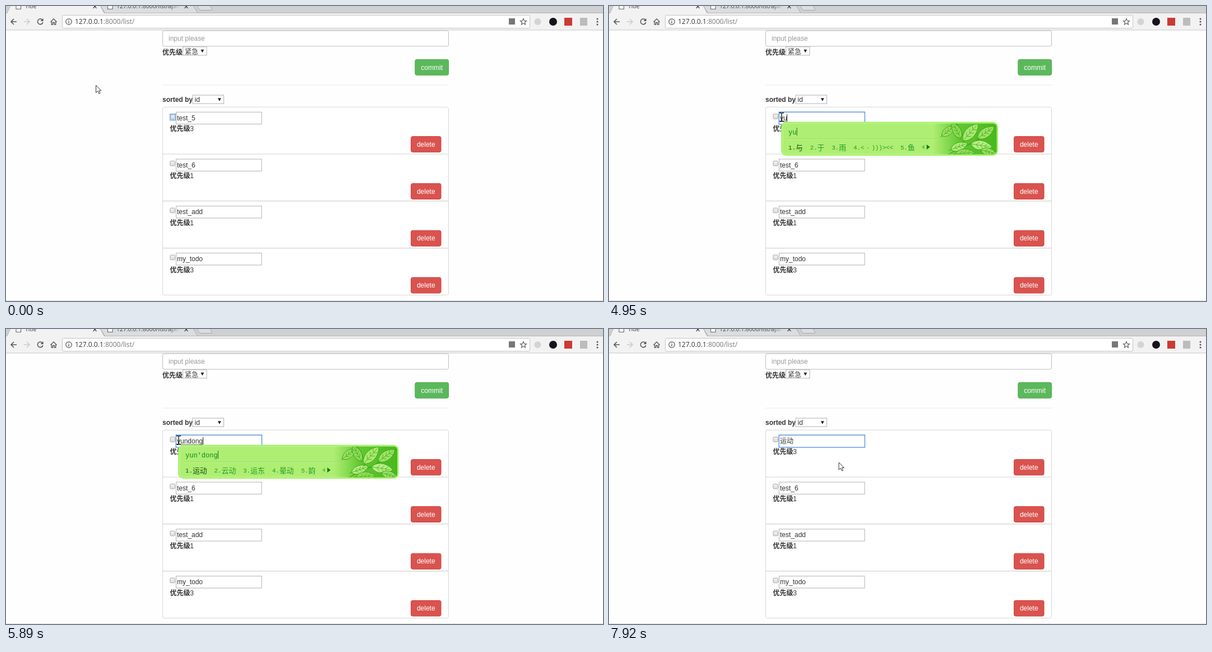
These frames come from a looping animation (1065 px wide and 526 px high, 8 s). An HTML page:

```html
<!DOCTYPE html>
<html lang="zh">
<head>
<meta charset="utf-8">
<title>Todo list</title>
<style>
html, body { margin: 0; width: 100%; height: 100%; overflow: hidden; background: #fff; }
svg { display: block; width: 1065px; height: 526px; }
text { font: 12px "Liberation Sans", "Noto Sans CJK SC", "Noto Sans CJK", sans-serif; fill: #333; white-space: pre; }
.b { font-weight: 700; }
.url { font: 12px "Open Sans", "Noto Sans", sans-serif; }
.tab { font: 10.4px "Open Sans", "Noto Sans", sans-serif; }
.mono { font: 12px "Liberation Mono", monospace; }
.num { font: 10.75px "Liberation Mono", monospace; }
.cand { font: 12.9px "Noto Sans CJK SC", "Noto Sans CJK", sans-serif; font-weight: 300; }
</style>
</head>
<body>
<svg id="stage" viewBox="0 0 1065 526" xmlns="http://www.w3.org/2000/svg">
  <defs>
    <linearGradient id="box" x1="0" y1="0" x2="0" y2="1">
      <stop offset="0" stop-color="#f2f2f2"/><stop offset="1" stop-color="#dcdcdc"/>
    </linearGradient>
    <linearGradient id="fade" gradientUnits="userSpaceOnUse" x1="292" y1="0" x2="312" y2="0">
      <stop offset="0" stop-color="#444"/><stop offset="1" stop-color="#444" stop-opacity="0"/>
    </linearGradient>
    <linearGradient id="leafBg" x1="0" y1="0" x2="1" y2="0">
      <stop offset="0" stop-color="#6ccb3a" stop-opacity="0"/>
      <stop offset=".4" stop-color="#62c832"/><stop offset="1" stop-color="#46b81c"/>
    </linearGradient>
    <clipPath id="art"><rect x="-116" y="209.5" width="114" height="55" rx="6"/></clipPath>
  </defs>
  <g id="page"></g>
  <g id="live"></g>
</svg>
<script>
const LOOP = 8000;
const page = document.getElementById('page');
const live = document.getElementById('live');

const rect = (x, y, w, h, fill, stroke = 'none', r = 0, sw = 1) =>
  `<rect x="${x}" y="${y}" width="${w}" height="${h}" rx="${r}" fill="${fill}" stroke="${stroke}" stroke-width="${sw}"/>`;
const text = (x, y, s, cls = '', fill = '#333', more = '') =>
  `<text x="${x}" y="${y}" class="${cls}" style="fill:${fill}" ${more}>${s.replace(/</g, '&lt;').replace(/>/g, '&gt;')}</text>`;
const path = (d, stroke, sw = 1, fill = 'none') =>
  `<path d="${d}" stroke="${stroke}" stroke-width="${sw}" fill="${fill}"/>`;
const dot = (x, y, r, fill) => `<circle cx="${x}" cy="${y}" r="${r}" fill="${fill}"/>`;

function browser() {
  const sheet = x => path(`M${x} -4V5.5H${x + 8.5}V-4`, '#666', 1.1, '#fff');
  const close = x => path(`M${x - 3} -2l6 6m0 -6l-6 6`, '#444', 1.3);
  return rect(0, 0, 1065, 13, '#cfd0d2') +
    path('M168 -1L176.500 12.500H342L334 -1Z', '#a9a9a9', 1, '#dcdddf') +
    path('M341 -1L344.500 6Q345 7.500 347 7.500H366Q368 7.500 367.500 6L364 -1Z', '#a9a9a9', 1, '#dcdddf') +
    rect(0, 12, 1065, 31, '#f2f2f2') +
    path('M0 12.500H2L8 -1H168L175 12.500H1065', '#b4b4b4', 1, '#f2f2f2') +
    rect(4, 12, 171, 2, '#f2f2f2') +
    sheet(18) + sheet(181.5) + close(158.5) + close(321.5) +
    text(34, 4, 'Title', 'tab', '#333') +
    text(197, 4, '127.0.0.1:8000/list/api/l', 'tab', 'url(#fade)') +
    path('M0 43H1065', '#b9b9b9') +
    rect(100.5, 16.5, 834, 23, '#fff', '#c4c4c4', 2) +
    path('M19 28H9M14 23L9 28L14 33', '#555', 1.6) +
    path('M32 28H42M37 23L42 28L37 33', '#ccc', 1.6) +
    path('M65 25A4.800 4.800 0 1 0 65.800 29', '#555', 1.6) +
    path('M66.500 22V27H61.500Z', 'none', 0, '#555') +
    path('M79.500 28.500L85 23L90.500 28.500M81.300 27.500V33H83.600V29.500H86.400V33H88.700V27.500', '#555', 1.3) +
    `<circle cx="112" cy="28" r="5.2" fill="none" stroke="#555" stroke-width="1.2"/>` +
    path('M112 27V31M112 24.700V26', '#555', 1.3) +
    text(123, 32, '127.0.0.1<tspan>', 'url', '#333').replace('&lt;tspan&gt;', '<tspan fill="#777" style="fill:#777">:8000/list/</tspan>') +
    rect(897, 22, 11, 11, '#777') +
    path('M923 22.500L924.600 26.200L928.500 26.500L925.500 29L926.500 33L923 30.800L919.500 33L920.500 29L917.500 26.500L921.400 26.200Z', '#555', 1.1) +
    dot(948.5, 28, 6, '#d4d4d4') + dot(976, 28, 7, '#14141c') +
    rect(996, 21, 14, 14, '#cc3a33') + rect(1024, 21, 13, 14, '#bcbcbc') +
    [23, 28, 33].map(y => dot(1055, y, 1.5, '#555')).join('');
}

const caretDown = (x, y) => path(`M${x - 3} ${y - 2.5}h6l-3 5.500z`, 'none', 0, '#222');
const button = (x, y, w, s, fill, line) =>
  rect(x + .5, y + .5, w - 1, 28, fill, line, 3) +
  text(x + w / 2, y + 18.7, s, '', '#fff', 'text-anchor="middle"');

function row(y, name, level) {
  return rect(292.9, y + 12.8, 8.4, 8.6, 'url(#box)', '#a8a8a8', 1.5) +
    rect(303.5, y + 9.4, 152.5, 21.3, '#fff', '#b2b2b2') +
    text(305, y + 24, name) +
    text(292.5, y + 43.5, '优先级', 'b') + text(328.3, y + 43.5, level) +
    button(722, y + 52.3, 54.5, 'delete', '#d9534f', '#d43f3a');
}

function list() {
  const rows = [['', '3'], ['test_6', '1'], ['test_add', '1'], ['my_todo', '3']];
  return rect(0, 43.5, 1065, 483, '#fefefe') +
    rect(279.5, 44, 510, 27.8, '#fff', '#bdbdbd', 3) +
    text(290, 62.3, 'input please', '', '#999') +
    text(279, 86.5, '优先级', 'b') +
    rect(315.5, 72.8, 42.5, 15, '#fff', '#b0b0b0') +
    text(319, 86.3, '紧急', '', '#444') + caretDown(350.3, 80.3) +
    button(729.3, 94.8, 60.7, 'commit', '#5cb85c', '#4cae4c') +
    path('M279 141H790', '#e8e8e8') +
    text(279, 171, 'sorted by', 'b') +
    rect(333, 159, 55.5, 15, '#fff', '#b0b0b0') +
    text(336.5, 171, 'id') + caretDown(380.8, 166.7) +
    rect(279.5, 180.2, 510, 335.2, '#fff', '#d6d6d6', 3) +
    [264, 347.6, 431.6].map(y => path(`M280 ${y}H789`, '#d2d2d2', 1.2)).join('') +
    rows.map((r, i) => row(179.8 + 83.8 * i, r[0], r[1])).join('') +
    path('M0 525.500H1065', '#dcdcdc');
}

// Pointer stops: time, x, y, kind (0 arrow, 1 text beam)
const stops = [
  [0, 160, 141, 0], [360, 172, 144, 0], [440, 210, 152, 0], [520, 258, 163, 0], [600, 300, 173, 0],
  [680, 335, 182, 0], [760, 357, 190, 1], [820, 372, 195, 1], [900, 384, 199, 1], [990, 368.5, 198.5, 1],
  [1300, 358, 198.5, 1], [1380, 343, 198.5, 1], [1450, 330, 198, 1], [1530, 319, 198, 1], [1600, 311, 198, 1],
  [1680, 308, 198, 1], [7450, 311, 200, 1], [7530, 322, 205, 1], [7610, 342, 212, 0], [7690, 366, 220, 0],
  [7770, 388, 228, 0], [7840, 402, 234, 0], [7920, 409.5, 237.5, 0]
];

// Typing: time, text in the field, spelling in the panel, candidates
const words = {
  yu: '与 于 雨 <·)))><< 鱼',
  yun: '云 运动 云朵 晕倒 运气',
  d: '运动 云端 运动会 运动鞋 运动员',
  do: '运动 熨斗 芸豆 云东 运东',
  dong: '运动 云动 运东 晕动 韵'
};
const typing = [
  [0, 'test_5'],
  [4950, 'yu', 'yu', words.yu], [5260, 'yun', 'yun', words.yun], [5490, 'yund', "yun'd", words.d],
  [5580, 'yund', "yun'do", words.do], [5640, 'yundo', "yun'do", words.do],
  [5720, 'yundo', "yun'don", words.do], [5800, 'yundon', "yun'don", words.do],
  [5890, 'yundong', "yun'dong", words.dong], [6120, '运动']
];
const at = (steps, t) => steps.filter(s => s[0] <= t).pop();

// Advance widths in thousandths of an em
const advance = { t: 278, e: 556, s: 500, y: 500, 运: 1000, 动: 1000 };
const width = s => [...s].reduce((w, c) => w + (advance[c] || 556), 0) * .012;

function leaf(x, y, len, deg, fill) {
  const w = len * .3;
  return `<g transform="translate(${x} ${y}) rotate(${deg})">` +
    path(`M0 0C${len * .2} ${-w} ${len * .7} ${-w} ${len} 0C${len * .7} ${w} ${len * .2} ${w} 0 0Z`, '#3aa51a', .9, fill) +
    path(`M-4 0H${len * .9}` + [.25, .45, .65].map(k => `M${len * k} 0l5 ${-w * .45}M${len * k} 0l5 ${w * .45}`).join(''), '#48ad22', .8) + '</g>';
}

function panel(spell, list) {
  let x = 320, out = '';
  list.split(' ').forEach((word, i) => {
    const color = i ? '#239a2a' : '#134d12';
    const face = word[0] === '<';
    out += text(x, 256, i + 1 + '.', 'num', color);
    if (face) {
      out += text(x + 12.9, 256, '<', 'num', color) + text(x + 22.5, 256, '·', 'num', color) +
        text(x + 32.3, 256, ')))><<', 'num', color);
    } else out += text(x + 12.9, 256.5, word, 'cand', color);
    x += (face ? 58 : word.length * 12.9) + 25.8;
  });
  const right = x + 135;
  const art = `<g transform="translate(${right} 0)" clip-path="url(#art)">` +
    rect(-116, 209, 116, 57, 'url(#leafBg)') +
    path('M-92 268C-70 250 -40 250 -4 214M-60 250C-58 235 -66 222 -74 208M-36 243C-30 250 -20 258 -4 262', '#3aa51a', 1.2) +
    leaf(-100, 232, 30, -38, '#9be063') + leaf(-66, 236, 32, -118, '#8fdb58') +
    leaf(-62, 240, 40, -48, '#a9e870') + leaf(-36, 236, 36, -35, '#9fe266') +
    leaf(-84, 256, 32, -20, '#b3ec7d') + leaf(-48, 246, 38, 8, '#b6ee82') +
    leaf(-76, 264, 34, -5, '#8fdb58') + leaf(-30, 256, 30, 18, '#9be063') + '</g>';
  return rect(308.5, 208, right - 309.5, 57.5, '#aeee73', '#a6f26a', 8, 3) +
    rect(310, 209.5, right - 312, 54.5, '#aeee73', '#c9f7a0', 6, .8) +
    path(`M315 237H${right - 105}`, '#8ed455') + path(`M315 238H${right - 105}`, '#c5f598') + art +
    text(320, 229, spell, 'mono b', '#0c8a20') +
    path(`M${320.8 + spell.length * 7.2} 217V231`, '#1a6a1a') + out +
    path(`M${x + 4} 247.500v8l-5 -4z`, 'none', 0, '#74c53e') +
    path(`M${x + 8} 247v9l6 -4.500z`, 'none', 0, '#0c7a1a');
}

function selection(t, px) {
  if (t < 1300 || t >= 4950) return '';
  const word = 'test_5';
  const edges = [...word].map((c, i) => width(word.slice(0, i))).concat(width(word));
  const gap = e => Math.abs(px - 4 * (t >= 1680) - 305 - e);
  const from = edges.reduce((a, b) => gap(b) < gap(a) ? b : a);
  const k = edges.indexOf(from);
  return k > 5 ? '' : rect(305 + from, 193, edges[6] - from, 13.3, '#3390ff') +
    text(305 + from, 203.8, word.slice(k), '', '#fff');
}

function pointer([, x, y, beam]) {
  const shape = beam
    ? path('M-4 -7.500H-1.500L0 -6.500L1.500 -7.500H4M0 -6.500V6.500M-4 7.500H-1.500L0 6.500L1.500 7.500H4', '#111', 1.3)
    : path('M.5 .5V13.500L3.600 10.700L5.900 15.500L8 14.500L5.800 9.900H10Z', '#333', 1, '#fff');
  return `<g transform="translate(${x} ${y})">${shape}</g>`;
}

function draw(t) {
  const cursor = at(stops, t);
  const [, value, spell, list] = at(typing, t);
  const end = 305 + width(value);
  let out = '';
  if (t < 1130) {
    out += rect(292.6, 192.6, 10.4, 11, '#c9e0f7', '#64a5e8', 0, 1.2) +
      rect(294, 194, 7.4, 7.4, 'url(#box)', '#a3b4c6', 1.5);
  } else out += rect(303.2, 189.1, 153.2, 21.9, '#fff', '#4a8fe0', 0, 1.3);
  out += text(305, 203.8, value) + selection(t, cursor[1]);
  if (spell) out += path(`M305 206H${end}`, '#444', .9);
  const blink = t >= 6120 && Math.floor((t - 6120) / 535) % 2 === 0;
  const clicked = t >= 1130 && t < 1450;
  if (spell || blink || clicked) out += path(`M${Math.floor(end) - (t >= 6120) + .5} 193V206`, '#222');
  if (spell) out += panel(spell, list);
  return out + pointer(cursor);
}

page.innerHTML = browser() + list();
let last = '';
const start = performance.now();
function tick() {
  const markup = draw((performance.now() - start) % LOOP);
  if (markup !== last) live.innerHTML = last = markup;
  requestAnimationFrame(tick);
}
tick();
</script>
</body>
</html>
```
